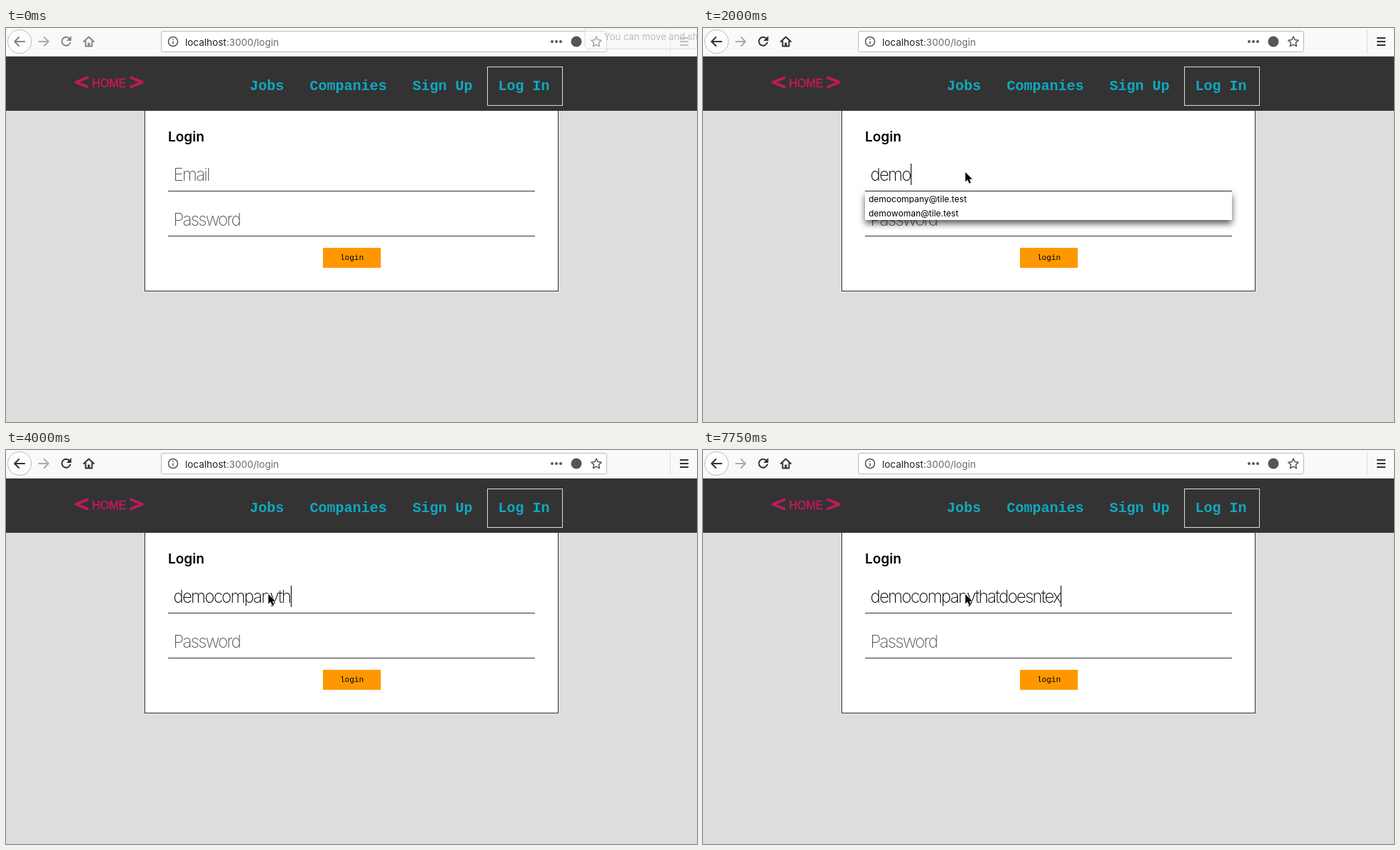
Write an HTML page that moves like this. It is 968 by 552 pixels and loops after 8000 ms.

```html
<!DOCTYPE html>
<html lang="en">
<head>
<meta charset="utf-8">
<title>Login</title>
<style>
  html, body { margin: 0; width: 100%; height: 100%; overflow: hidden; background: #ddd; }
  svg { display: block; width: 100%; height: 100%; }
  text { white-space: pre; }
  .ui { font-family: Inter, "Noto Sans", sans-serif; }
  .nav { font: bold 20px "Liberation Mono", monospace; fill: #0fa9c0; }
  .field { font-size: 24px; font-weight: 200; letter-spacing: -1.7px; }
  .hint { fill: #555; }
  .line { fill: none; stroke: currentColor; stroke-width: 2; stroke-linecap: round; stroke-linejoin: round; }
  .thin { stroke-width: 1.5; }
  #list { filter: drop-shadow(0 5px 5px rgba(0, 0, 0, .65)); }
</style>
</head>
<body>
<svg viewBox="0 0 968 552">
  <rect width="968" height="552" fill="#ddd"/>

  <g id="card">
    <rect x="194.5" y="100.5" width="579" height="268" fill="#fff" stroke="#333"/>
    <text class="ui" x="227" y="159" font-size="19" font-weight="600">Login</text>
    <text id="email" class="ui field hint" x="234.5" y="214">Email</text>
    <text id="typed" class="ui field" x="234.5" y="214"></text>
    <text class="ui field hint" x="234.5" y="277">Password</text>
    <path d="M227 228.5H741M227 291.5H741" stroke="#333"/>
    <rect x="444" y="308" width="81" height="28" fill="#ff9800"/>
    <text x="468" y="325" font-family="Liberation Mono, monospace" font-size="11">login</text>
    <rect id="caret" y="190" width="1" height="30"/>
  </g>

  <rect y="40" width="968" height="76" fill="#333"/>
  <g color="#c2185b">
    <path class="line" style="stroke-width:3.6" d="M114 69.5L98 76L114 82.5M175 69.5L191 76L175 82.5"/>
    <text x="120.5" y="83" font-family="Liberation Sans, sans-serif" font-size="16" fill="currentColor" stroke="currentColor" stroke-width=".6">HOME</text>
  </g>
  <g id="links"></g>
  <rect x="674.5" y="54.5" width="105" height="54" fill="none" stroke="#ddd"/>

  <g id="toolbar">
    <rect width="968" height="40" fill="#f9f9fa"/>
    <path d="M0 39.5H968" stroke="#d5d5d5"/>
    <path d="M930.5 3V35" stroke="#ddd"/>
    <rect x="217.5" y="4.5" width="624" height="29" rx="2.5" fill="#fff" stroke="#bcbcbc"/>
    <circle cx="19" cy="19" r="16.5" fill="#fdfdfd" stroke="#bbb"/>
    <path class="line" d="M46 19H59M53.5 13L59.5 19L53.5 25" color="#aaa"/>
    <g id="buttons">
      <path class="line" d="M26 19H12.5M18 13L12 19L18 25"/>
      <path class="line" d="M89 15A6 6 0 1 0 90 20.5"/>
      <path d="M91.5 11V18H84.5Z" fill="currentColor"/>
      <path class="line" d="M109 19L116 12.5L123 19M111.5 18.5V25.5H120.5V18.5"/>
      <rect x="114.5" y="20.5" width="3" height="5" fill="currentColor"/>
      <path d="M944 14H956M944 19H956M944 24H956" stroke="currentColor" stroke-width="2"/>
    </g>
    <g color="#555">
      <circle class="line thin" cx="234" cy="19" r="6.5"/>
      <path d="M234 18.5V22.5M234 15V16.5" stroke="currentColor" stroke-width="1.5"/>
      <path class="line" style="stroke-width:4" stroke-dasharray="0 6" d="M765 19H778"/>
      <circle cx="799" cy="19" r="7.5" fill="currentColor"/>
      <polygon id="star" class="line thin"/>
    </g>
    <text class="ui" x="251" y="24.5" font-size="13.5" fill="#222">localhost<tspan fill="#6a6a6a">:3000/login</tspan></text>
  </g>

  <g id="notice">
    <path d="M811 0H968V29H815Q811 29 811 25Z" fill="#fafafa" fill-opacity=".5" stroke="#ddd"/>
    <text class="ui" x="838" y="17" font-size="13" fill="#bdbdbd">You can move and share</text>
  </g>

  <g id="list"></g>
  <path id="cursor" d="M0 0V13.5L3.2 10.6L5.4 15.8L7.8 14.8L5.6 9.8H9.8Z" stroke="#fff" stroke-width="1.2" paint-order="stroke"/>
</svg>

<script>
const LOOP = 8000, TICK = 250, BLINK = 450;
const FOCUS = 1000, CLICK = 1250;
const NAME = "democompanythatdoesntex";
const MAILS = ["democompany", "demowoman", "design", "deskhelper", "deputy"].map(n => n + "@tile.test");

// Typing bursts: each runs at an even pace until its part of the name is complete.
const BURSTS = [
  { from: 1500, to: 2000, part: "demo" },
  { from: 2250, to: 3010, part: "company" },
  { from: 3500, to: 4250, part: "that" },
  { from: 4500, to: 4750, part: "d" },
  { from: 5750, to: 6500, part: "oes" },
  { from: 6750, to: 7750, part: "ntex" }
];

const $ = id => document.getElementById(id);
const show = (id, on) => $(id).setAttribute("visibility", on ? "visible" : "hidden");
const clamp = v => Math.max(0, Math.min(1, v));
const mix = (a, b, p) => a + (b - a) * p;

function buildLinks() {
  let x = 341.5;
  $("links").innerHTML = ["Jobs", "Companies", "Sign Up", "Log In"].map(label => {
    const link = `<text class="nav" x="${x}" y="87">${label}</text>`;
    x += 12 * (label.length + 3);
    return link;
  }).join("");
}

function buildStar() {
  const points = Array.from({ length: 10 }, (_, i) => {
    const r = i % 2 ? 3.6 : 7.5, a = i * Math.PI / 5;
    return `${827 + r * Math.sin(a)},${19.5 - r * Math.cos(a)}`;
  });
  $("star").setAttribute("points", points.join(" "));
}

const lettersAt = t => BURSTS.reduce(
  (n, b) => n + Math.floor(b.part.length * clamp((t - b.from) / (b.to - b.from))), 0);

// The caret stays lit while typing and blinks from the last key press on.
function caretAt(t) {
  if (t < CLICK) return false;
  const last = BURSTS.filter(b => b.from < t).pop();
  const idle = t - (last ? last.to : CLICK);
  return idle < 0 || Math.floor(idle / BLINK) % 2 === 0;
}

function drawList(text) {
  const hits = text ? MAILS.filter(mail => mail.startsWith(text)) : [];
  const rows = hits.map((mail, i) =>
    `<text class="ui" x="232" y="${244 + 20 * i}" font-size="12">${mail}</text>`);
  $("list").innerHTML =
    `<rect x="227" y="229" width="514" height="${20 * hits.length}" fill="#fff"/>` + rows.join("");
}

function draw(t) {
  const text = NAME.slice(0, lettersAt(t));
  $("typed").textContent = text;
  show("email", !text);
  drawList(text);

  const width = text ? $("typed").getComputedTextLength() : 0;
  $("caret").setAttribute("x", Math.round(235 + width));
  show("caret", caretAt(t));

  show("notice", t < TICK);
  $("buttons").setAttribute("color", t < FOCUS ? "#858585" : "#333");

  const p = clamp((t - TICK) / 500);
  show("cursor", t >= TICK);
  $("cursor").setAttribute("transform", `translate(${mix(470, 367.5, p)} ${mix(264, 202, p)})`);
}

let shown;
function tick() {
  const t = Math.floor(performance.now() % LOOP / TICK) * TICK;
  if (t !== shown) draw(shown = t);
  requestAnimationFrame(tick);
}

buildLinks();
buildStar();
tick();
</script>
</body>
</html>
```
